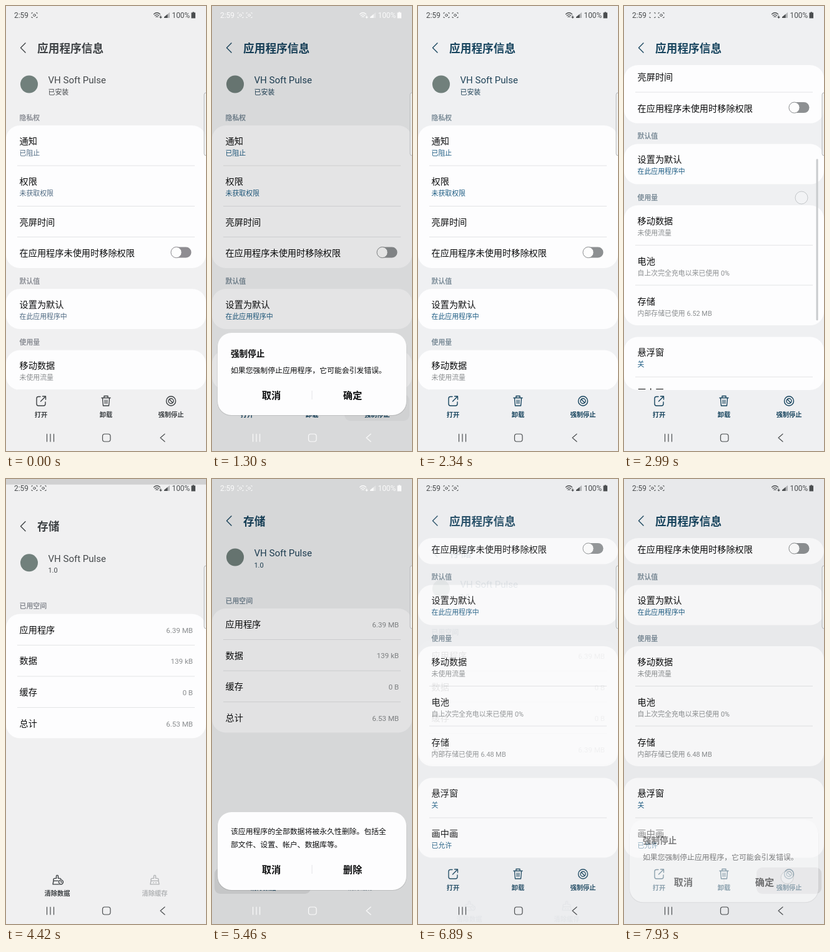
These frames come from a looping animation (320x708 px, 8000 ms). An HTML page:

```html
<!DOCTYPE html>
<html lang="zh-CN">
<head>
<meta charset="utf-8">
<title>App settings</title>
<style>
html, body { margin: 0; width: 100%; height: 100%; overflow: hidden; background: #eff0f2; }
svg {
  display: block; width: 100%; height: 100%;
  font-family: Roboto, "Noto Sans CJK SC", "Noto Sans CJK", sans-serif;
  --bg: #eff0f2; --title: #17445e; --blue: #1d5c83; --ink: #204358; --section: #7b8c98; --track: #8d9092;
}
svg.grey {
  --bg: #f0f0f1; --title: #3d4144; --blue: #4d6880; --ink: #45494c; --section: #8b8e95; --track: #8f8d92;
}
.bg { fill: var(--bg); }
.card { fill: #fdfdfe; }
.main { fill: #0c0d0e; }
.title { fill: var(--title); }
.blue { fill: var(--blue); }
.ink { fill: var(--ink); }
.section { fill: var(--section); }
.mute { fill: #8b8e90; }
.line { stroke: #e3e4e6; stroke-width: 1; }
.icon { fill: none; stroke: currentColor; stroke-width: 1.4; stroke-linecap: round; stroke-linejoin: round; }
.action { color: var(--title); }
.action text, .ui text { fill: currentColor; }
.off { color: #b3b5b7; }
.off.cool { color: #98a6af; }
</style>
</head>
<body>
<svg id="stage" viewBox="0 0 320 708"></svg>
<script>
const LOOP = 8000, DIM = 0.17;
const stage = document.getElementById('stage');
const $ = id => document.getElementById(id);

// Text placed by its vertical centre
function text(x, cy, str, size, cls = 'main', opt = '') {
  return `<text x="${x}" y="${(cy + size * 0.37).toFixed(2)}" font-size="${size}" class="${cls}" ${opt}>${str}</text>`;
}
const bold = 'font-weight="700"';
const mid = 'text-anchor="middle"';
const card = (y0, y1) => `<rect class="card" y="${y0}" width="320" height="${y1 - y0}" rx="22"/>`;
const line = y => `<path class="line" d="M18 ${y}H302"/>`;
const icon = (d, opt = '') => `<path class="icon" d="${d}" ${opt}/>`;
const section = (y, s) => text(21.5, y, s, 10.9, 'section', bold);
const row = (y, name, note, cls) =>
  text(21.5, y, name, 14.2) + (note ? text(21.5, y + 19.3, note, 10.9, cls) : '');

function header(title) {
  return icon('M31 59L23.5 66.5L31 74', 'style="color:var(--title)"') + text(50, 67, title, 17.7, 'title', bold);
}
function app(note) {
  return '<circle cx="37" cy="124.5" r="14" fill="#71807c"/>' +
    text(67.5, 117.5, 'VH Soft Pulse', 15, 'ink') + text(67.5, 136.5, note, 10.9, 'ink');
}
function action(x, label, art, id = '', cls = '') {
  return `<g class="action ${cls}" ${id && `id="${id}"`}>${art}${text(x, 650, label, 10.3, '', mid + ' ' + bold)}</g>`;
}
function press(id, x, y, w, h, r) {
  return `<rect id="${id}" x="${x}" y="${y}" width="${w}" height="${h}" rx="${r}" opacity="0"/>`;
}

function infoPage() {
  const open = icon('M55 621.5H52a3 3 0 0 0-3 3V633a3 3 0 0 0 3 3H60a3 3 0 0 0 3-3V630M58.5 621H63.5V626M63 621.5L55.5 629');
  const trash = icon('M153 623.5H167M157 623V620.5H163V623M154.5 624L155.5 636H164.5L165.5 624M158.5 627V632.5M161.5 627V632.5');
  const stop = icon('M256.5 628.5a7.5 7.5 0 1 0 15 0a7.5 7.5 0 1 0-15 0M260 628.5a4 4 0 1 0 8 0a4 4 0 1 0-8 0M261.3 625.8L266.7 631.2');
  return `<rect class="bg" width="320" height="708"/>
    <g clip-path="url(#view)"><g id="scroll">
      ${app('已安装')}
      ${section(178, '隐私权')}${card(190, 417)}
      ${row(214.5, '通知', '已阻止', 'blue')}${line(254)}
      ${row(279, '权限', '未获取权限', 'blue')}${line(318.5)}
      ${row(343.5, '亮屏时间')}${line(367.5)}
      ${row(393, '在应用程序未使用时移除权限')}
      <rect x="264" y="383.5" width="32.5" height="17" rx="8.5" fill="var(--track)"/>
      <circle cx="272.5" cy="392" r="8.6" fill="#fdfdfd" stroke="var(--track)"/>
      ${section(437.5, '默认值')}${card(450, 514)}
      ${row(474.5, '设置为默认', '在此应用程序中', 'blue')}
      ${section(535, '使用量')}${card(547.5, 738.5)}
      ${press('pressRow', 0, 675, 320, 63, 20)}
      ${row(572, '移动数据', '未使用流量', 'mute')}${line(611)}
      ${row(636, '电池', '自上次完全充电以来已使用 0%', 'mute')}${line(674.5)}
      ${row(700, '存储', '<tspan id="used"></tspan>', 'mute')}
      ${card(757, 884)}
      ${row(781.5, '悬浮窗', '关', 'blue')}${line(820.5)}
      ${row(845.5, '画中画', '已允许', 'blue')}
    </g></g>
    ${header('应用程序信息')}
    <rect id="bar" x="307.5" width="3" height="257" rx="1.5" fill="#c9cbcd"/>
    ${press('pressStop', 212, 618, 104, 42, 9)}
    ${action(56, '打开', open)}${action(160, '卸载', trash)}${action(264, '强制停止', stop)}`;
}

function storagePage() {
  const brush = x => icon(`M${x - 1.5} 626.5V623a1.5 1.5 0 0 1 3 0V626.5H${x + 4}a2 2 0 0 1 2 2V630.5H${x - 6}V628.5a2 2 0 0 1 2-2ZM${x - 6} 630.5L${x - 7} 636H${x + 7}L${x + 6} 630.5`, 'stroke-width="1.2"');
  const clock = `<circle cx="88" cy="632.5" r="4.6" class="bg"/>` + icon('M84.5 632.5a3.5 3.5 0 1 0 7 0a3.5 3.5 0 1 0-7 0M88 631V632.5H89.3');
  const names = ['应用程序', '数据', '缓存', '总计'];
  const rows = names.map((n, i) => {
    const y = 230.8 + i * 49.6;
    return row(y, n) + (i < 3 ? line(y + 24.7) : '') + text(299, y + 0.8, '', 11.6, 'mute', `id="size${i}" text-anchor="end"`);
  }).join('');
  return `<rect class="bg" width="320" height="708"/>
    ${header('存储')}${app('1.0')}${section(193.5, '已用空间')}${card(206, 403.5)}${rows}
    ${press('pressClear', 4, 619, 154, 41, 9)}
    ${action(82, '清除数据', brush(82) + clock, 'clearData')}
    ${action(238, '清除缓存', brush(238) + icon('M235.5 633.5H236.5M239.5 633.5H240.5'), 'clearCache', 'off')}`;
}

function dialog(id, y0, y1, body, by, ok) {
  return `<g id="${id}" opacity="0">
    <rect x="8.5" y="${y0 + 1}" width="303" height="${y1 - y0}" rx="22" opacity=".12"/>
    <rect x="9" y="${y0}" width="302" height="${y1 - y0}" rx="22" class="card"/>${body}
    ${text(95, by, '取消', 15.2, 'main', mid + ' ' + bold)}${text(225, by, ok, 15.2, 'main', mid + ' ' + bold)}
    <path class="line" d="M160 ${by - 7}V${by + 7}"/></g>`;
}

function capture(x, id) {
  return icon(`M${x - 4.5} 12V10.8H${x - 3}M${x + 3} 10.8H${x + 4.5}V12M${x + 4.5} 17.3V18.5H${x + 3}M${x - 3} 18.5H${x - 4.5}V17.3`, 'style="stroke-width:.9"') +
    `<circle id="${id}" class="icon" cx="${x}" cy="14.7" r="1.8" style="stroke-width:1"/>`;
}

function systemUi() {
  return `<g class="ui" id="ui">
    ${text(13, 15, '2:59', 11.9, '')}${capture(45.5, 'dot')}<g id="second">${capture(59.5, 'dot2')}</g>
    ${icon('M236.5 13Q241.5 8.5 246.5 13M238.2 15.3Q241.5 12.3 244.8 15.3M240 17.4Q241.5 16 243 17.4M247.5 15.5V19M246 17.6L247.5 19L249 17.6', 'style="stroke-width:1.2"')}
    <path d="M253 19V17.5L262 10V19Z" fill="currentColor" opacity=".35"/><path d="M253 19V17.5L258.5 13V19Z" fill="currentColor"/>
    ${text(265.5, 15, '100%', 11.9, '')}
    <path d="M296.5 10.5H298.5V9.5H301V10.5H303V19.5H296.5Z" fill="currentColor"/>
    ${icon('M65.5 681V693M71 681V693M76.5 681V693M254 681L247 687L254 693', 'style="stroke-width:1.2"')}
    <rect class="icon" x="154.5" y="681" width="12.5" height="12" rx="3.5" style="stroke-width:1.2"/></g>`;
}

stage.innerHTML = `<defs><clipPath id="view"><rect y="94" width="320" height="517" rx="22"/></clipPath></defs>
  ${infoPage()}
  <rect id="behind" width="320" height="708" opacity="0"/>
  <g id="storage">${storagePage()}</g>
  <rect id="dim" width="320" height="708" opacity="0"/>
  <rect x="317" y="138" width="8" height="100" rx="3" fill="#f0f1f2" fill-opacity=".75" stroke="#b4b7ba"/>
  ${dialog('stopBox', 520, 651, text(30, 553, '强制停止', 13.6, 'main', bold) +
    text(30, 579.5, '如果您强制停止应用程序，它可能会引发错误。', 11.85), 619, '确定')}
  ${dialog('clearBox', 530, 654, text(30, 560.5, '该应用程序的全部数据将被永久性删除。包括全', 11.85) +
    text(30, 582, '部文件、设置、帐户、数据库等。', 11.85), 621, '删除')}
  ${systemUi()}
  <circle id="touch" r="10" fill="#f4f5f6" fill-opacity=".6" stroke="#b9bdc0" stroke-opacity=".8"/>`;

const clamp = v => Math.max(0, Math.min(1, v));
const ramp = (t, a, b) => clamp((t - a) / (b - a));
const within = (t, a, b) => t >= a && t < b;
const fade = (t, a, b, rise, fall) => Math.min(ramp(t, a, a + rise), 1 - ramp(t, b, b + fall));
const set = (id, name, value) => $(id).setAttribute(name, value);

// id, opens, closes
const boxes = [['stopBox', 1060, 1970], ['clearBox', 5200, 6010], ['stopBox', 7860, 9000]];
// down, up, start x and y, end x and y
const touches = [
  [900, 1040, 264, 636, 264, 636],
  [1780, 1950, 225, 619, 225, 619],
  [2600, 3010, 284, 535, 284, 305],
  [3760, 3940, 150, 428, 150, 428],
  [5020, 5180, 82, 638, 82, 638],
  [5880, 6060, 231, 615, 231, 615],
  [6520, 6660, 251, 687, 251, 687],
  [7700, 7890, 261, 634, 261, 634]
];

function scrollAt(t) {
  if (t < 2990) return 230 * ramp(t, 2600, 2990);
  return 281.5 - 51.5 * (1 - ramp(t, 2990, 3400)) ** 3;
}

function drawBoxes(t) {
  let dim = 0;
  const shown = { stopBox: [0, 0], clearBox: [0, 0] };
  for (const [id, a, b] of boxes) {
    if (!within(t, a, b + 270)) continue;
    dim = DIM * fade(t, a, b, 420, 270);
    shown[id] = [fade(t, a, b, 140, 100), 64 * (1 - ramp(t, a, a + 240)) ** 3];
  }
  for (const id in shown) {
    set(id, 'opacity', shown[id][0]);
    set(id, 'transform', `translate(0 ${shown[id][1]})`);
  }
  set('dim', 'opacity', dim);
}

function drawStorage(t) {
  const into = ramp(t, 4080, 4640), out = ramp(t, 6690, 6910);
  const alpha = Math.min(ramp(t, 4080, 4230), 1 - out);
  set('storage', 'opacity', alpha);
  set('storage', 'transform', `translate(0 ${148 * (1 - into) ** 3 + 60 * out ** 2})`);
  set('behind', 'opacity', 0.13 * alpha);
  const cleared = t >= 6030;
  const sizes = ['6.39 MB', cleared ? '0 B' : '139 kB', '0 B', cleared ? '6.39 MB' : '6.53 MB'];
  sizes.forEach((s, i) => { $('size' + i).textContent = s; });
  $('clearData').setAttribute('class', cleared ? 'action off cool' : 'action');
  $('clearCache').setAttribute('class', t > 4680 ? 'action off cool' : 'action off');
}

function drawTouch(t) {
  let alpha = 0;
  for (const [a, b, x0, y0, x1, y1] of touches) {
    if (!within(t, a, b + 150)) continue;
    const p = ramp(t, a, Math.min(b, a + 390));
    alpha = fade(t, a, b, 60, 150);
    set('touch', 'cx', x0 + (x1 - x0) * p);
    set('touch', 'cy', y0 + (y1 - y0) * p);
  }
  set('touch', 'opacity', alpha);
}

function draw(t) {
  stage.classList.toggle('grey', t < 1040 || within(t, 3770, 4680));
  const y = scrollAt(t);
  set('scroll', 'transform', `translate(0 ${-y})`);
  set('bar', 'y', 94 + y * 0.648);
  set('bar', 'opacity', fade(t, 2600, 3400, 80, 250));
  $('used').textContent = '内部存储已使用 ' + (t < 6500 ? '6.52' : '6.48') + ' MB';
  set('pressStop', 'opacity', 0.09 * Math.max(fade(t, 910, 1150, 80, 250), fade(t, 7710, 8000, 80, 250)));
  set('pressRow', 'opacity', 0.07 * fade(t, 3780, 4000, 80, 200));
  set('pressClear', 'opacity', 0.08 * fade(t, 5030, 5480, 80, 250));
  drawStorage(t);
  drawBoxes(t);
  drawTouch(t);
  const light = within(t, 1190, 2000) || within(t, 5330, 6030);
  $('ui').style.color = light ? '#fafafa' : '#4b4e50';
  set('second', 'opacity', t < 520 ? 0 : 1);
  set('dot', 'opacity', within(t, 2700, 3400) || within(t, 6000, 6500) ? 0 : 1);
}

const start = performance.now();
function tick() {
  draw((performance.now() - start) % LOOP);
  requestAnimationFrame(tick);
}
tick();
</script>
</body>
</html>
```
